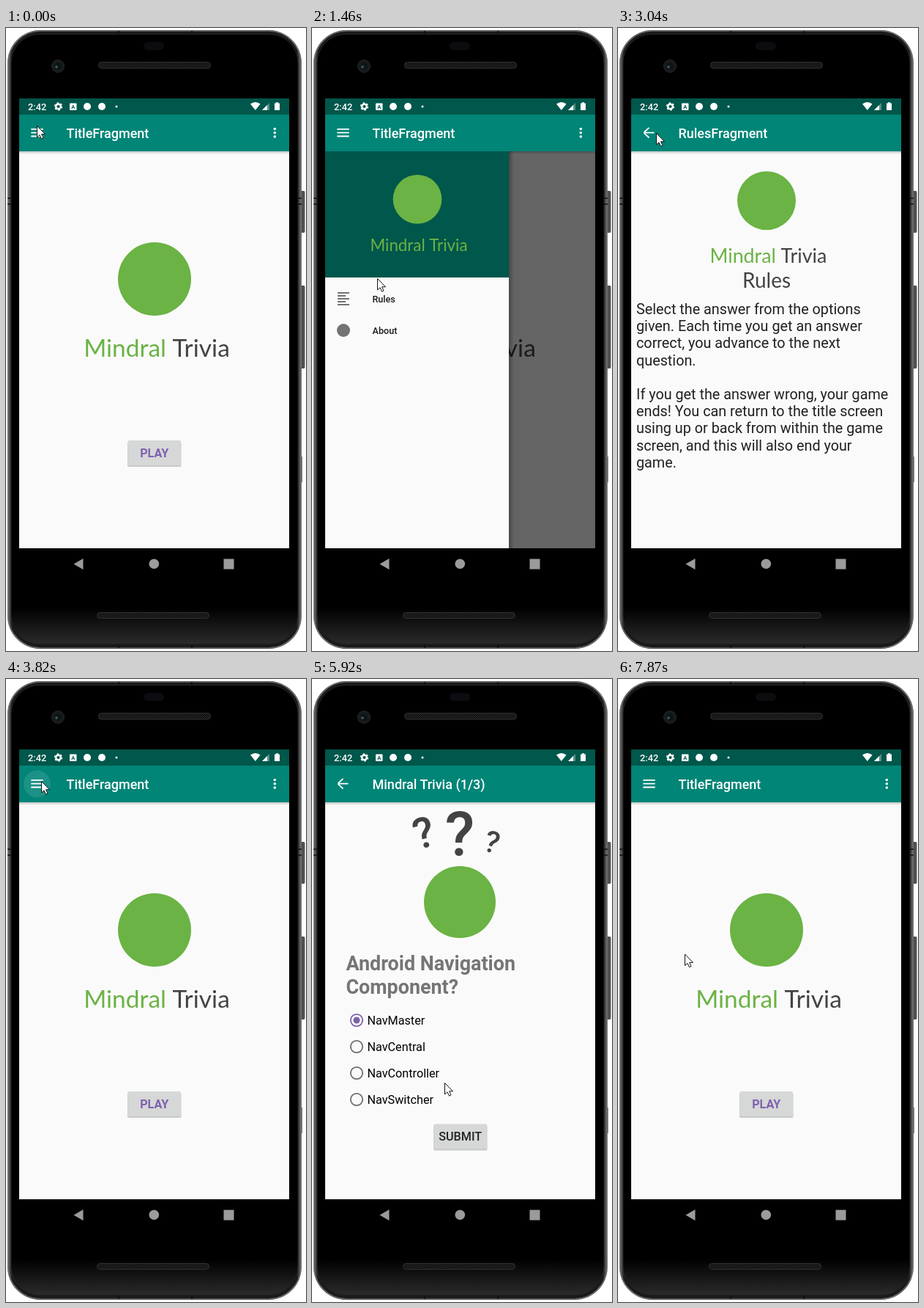
An HTML page that plays this animation: 410x849 px, repeating every 8000 ms.

```html
<!DOCTYPE html>
<html lang="en">
<head>
<meta charset="utf-8">
<title>Trivia app walkthrough</title>
<style>
  html, body { margin: 0; width: 100%; height: 100%; overflow: hidden; background: #fff; }
  svg { display: block; width: 100vw; height: 100vh; font-family: Roboto, sans-serif; }
  .word { font: 33.5px Lato, sans-serif; }
  .medium { font-weight: 500; }
  .bold { font-weight: 700; }
</style>
</head>
<body>
<svg viewBox="0 0 410 849">
  <defs>
    <linearGradient id="rim" x2="1" y2="0">
      <stop offset="0" stop-color="#777"/><stop offset=".016" stop-color="#1a1a1a"/>
      <stop offset=".984" stop-color="#1a1a1a"/><stop offset="1" stop-color="#777"/>
    </linearGradient>
    <linearGradient id="bezel" x2="0" y2="1">
      <stop offset=".94"/><stop offset="1" stop-color="#2b2b2b"/>
    </linearGradient>
    <linearGradient id="down" x2="0" y2="1">
      <stop stop-opacity=".22"/><stop offset="1" stop-opacity="0"/>
    </linearGradient>
    <linearGradient id="across">
      <stop stop-opacity=".3"/><stop offset="1" stop-opacity="0"/>
    </linearGradient>
    <pattern id="mesh" width="3" height="3" patternUnits="userSpaceOnUse">
      <rect width="3" height="3" fill="#101010"/><path d="M0 3L3 0" stroke="#333" stroke-width=".8"/>
    </pattern>
    <clipPath id="content"><rect x="18" y="168" width="369" height="541"/></clipPath>
    <clipPath id="playClip"><rect x="166.500" y="562" width="72.500" height="34" rx="2"/></clipPath>
  </defs>

  <!-- phone body -->
  <path d="M402 222h5q1.500 0 1.500 2v53q0 2-1.500 2h-5zM402 351h5q1.500 0 1.500 2v109q0 2-1.500 2h-5z" fill="#505050"/>
  <path d="M403 584h2v35h-2z" fill="#777"/>
  <rect x="2" y="3" width="402" height="843" rx="45" fill="url(#rim)"/>
  <rect x="3" y="4" width="400" height="841" rx="44" fill="none" stroke="#6c6c6c" stroke-width="1.500"/>
  <rect x="7" y="8.500" width="392" height="831" rx="39" fill="url(#bezel)" stroke="#222"/>
  <path d="M2 232h5M2 240h5M399 232h5M399 240h5M154 4v6M254 4v6M154 840v5M254 840v5" stroke="#111" stroke-width="1.500"/>
  <rect x="188" y="19" width="28" height="11" rx="5.500" fill="#0c0c10"/>
  <circle cx="71" cy="52" r="8.500" fill="#171a1b" stroke="#262626"/>
  <circle cx="71" cy="52" r="4.500" fill="#0a1515"/><circle cx="69" cy="53" r="1.800" fill="#49605f"/>
  <rect x="126.500" y="46.500" width="153" height="8.500" rx="4" fill="url(#mesh)" stroke="#303030"/>
  <rect x="124.500" y="796.500" width="153" height="8" rx="4" fill="url(#mesh)" stroke="#303030"/>
  <path d="M92.500 730.500L105.500 723v15zM297.500 723.500h14v14h-14z" fill="#9b9b9b"/>
  <circle cx="202.300" cy="730.300" r="6.800" fill="#9b9b9b"/>

  <!-- screen -->
  <rect x="18" y="96" width="369" height="613" fill="#fafafa"/>
  <g clip-path="url(#content)">
    <g id="rules">
      <g id="rulesBrand" transform="translate(40.600 -38.400) scale(.8)"></g>
      <text x="203" y="354" font-size="28" text-anchor="middle" fill="#434343" font-family="Lato, sans-serif">Rules</text>
      <g id="rulesText" font-size="19.800" fill="#212121"></g>
    </g>
    <g id="game">
      <g class="medium" fill="#434343" text-anchor="middle">
        <text x="202" y="241" font-size="83">?</text>
        <text transform="translate(158 229) rotate(-15)" font-size="58">?</text>
        <text transform="translate(242 236) rotate(16)" font-size="41">?</text>
      </g>
      <circle cx="202" cy="304" r="49" fill="#6ab344"/>
      <g class="bold" font-size="26.900" fill="#757575">
        <text x="46.500" y="397">Android Navigation</text><text x="46.500" y="428.500">Component?</text>
      </g>
      <g id="answers" font-size="16.200"></g>
      <g id="submit"></g>
    </g>
    <g id="home">
      <g id="homeBrand"></g>
      <g id="play"></g>
      <circle id="press" cx="201" cy="579" fill="#000" clip-path="url(#playClip)"/>
      <text class="bold" x="202.700" y="585.200" font-size="16.200" text-anchor="middle" fill="#7e62b0">PLAY</text>
    </g>
    <rect x="18" y="168" width="369" height="4" fill="url(#down)"/>
    <rect id="scrim" x="18" y="168" width="369" height="541"/>
    <g id="drawer">
      <rect x="269" y="168" width="7" height="541" fill="url(#across)"/>
      <rect x="18" y="168" width="251" height="541" fill="#fafafa"/>
      <rect x="18" y="168" width="251" height="172" fill="#00574b"/>
      <g id="drawerBrand" transform="translate(8.600 5.200) scale(.667)"></g>
      <path d="M35 361h16M35 365h11M35 369h16M35 373h11M35 377h16" stroke="#737373" stroke-width="1.800"/>
      <circle cx="43" cy="412" r="9" fill="#737373"/>
      <g class="medium" font-size="12.600" fill="#1c1c1c"><text x="82.500" y="374">Rules</text><text x="82.500" y="416.500">About</text></g>
    </g>
  </g>

  <!-- status bar and toolbar -->
  <rect x="18" y="96" width="369" height="22" fill="#00574b"/>
  <rect x="18" y="118" width="369" height="50" fill="#008577"/>
  <g fill="#fff">
    <text class="medium" x="30" y="111.500" font-size="12.800">2:42</text>
    <circle cx="71.500" cy="107" r="3.300" fill="none" stroke="#fff" stroke-width="2.400"/>
    <circle cx="71.500" cy="107" r="4.900" fill="none" stroke="#fff" stroke-width="1.500" stroke-dasharray="2.500 2.630"/>
    <rect x="87" y="102.500" width="9.500" height="9.500" rx="1"/>
    <text class="bold" x="91.700" y="110" font-size="7.500" text-anchor="middle" fill="#00574b">A</text>
    <circle cx="111" cy="107" r="5"/><circle cx="131" cy="107" r="5"/><circle cx="151" cy="107" r="1.500"/>
    <path d="M334 103.500q6.800-5 13.600 0L340.800 112z"/>
    <path d="M350 112l10-10v10z" opacity=".35"/><path d="M350 112l7-7v7z"/>
    <path d="M367 102.500h2v-1.300h3v1.300h2v9.500h-7z"/>
    <g id="more"><circle cx="367.300" cy="137.500" r="1.800"/><circle cx="367.300" cy="142.800" r="1.800"/><circle cx="367.300" cy="148.100" r="1.800"/></g>
    <text id="heading" class="medium" x="82.500" y="149.700" font-size="18"></text>
    <circle id="ripple" cx="42.500" cy="143" r="18.500"/>
  </g>
  <path id="icon" fill="none" stroke="#fff" stroke-width="1.800"/>
  <path id="cursor" d="M.5.5V16L4 12.800L6.500 18.200L9 17L6.600 11.800H11.500Z" fill="#fff" stroke="#111"/>
</svg>
<script>
const el = Object.fromEntries([...document.querySelectorAll('[id]')].map(e => [e.id, e]));
const LOOP = 8000, FRAME = LOOP / 61;
const BRAND = 'Mindral', PRODUCT = 'Trivia', HOME = 'TitleFragment';
const GREEN = '#6ab344', DARK = '#434343', DRAWER_WIDTH = 251, SLIDE = 184.5;

const pages = {
  rules: { heading: 'RulesFragment', enter: 1940, leave: 3440, fade: 360 },
  game: { heading: `${BRAND} ${PRODUCT} (1/3)`, enter: 5120, leave: 6780, fade: 390 }
};

// Pointer trips between the places it clicks or rests.
const trips = [
  { from: 0, to: 260, x: 43, y: 144 },
  { from: 1070, to: 1440, x: 89, y: 341 },
  { from: 1440, to: 1720, x: 103, y: 362 },
  { from: 2640, to: 3010, x: 52, y: 143 },
  { from: 3010, to: 3170, x: 48, y: 139 },
  { from: 4080, to: 4730, x: 201, y: 576.5 },
  { from: 5530, to: 5900, x: 181, y: 550 },
  { from: 5900, to: 6570, x: 42.5, y: 145 },
  { from: 7480, to: 7860, x: 91, y: 374.5 }
];

const mix = (a, b, p) => a + (b - a) * p;
const progress = (t, from, to) => Math.max(0, Math.min(1, (t - from) / (to - from)));
const ramp = (t, from, to) => (1 - Math.cos(Math.PI * progress(t, from, to))) / 2;
const pulse = (t, from, to) => Math.sin(Math.PI * progress(t, from, to));
const shown = (t, { enter, leave, fade }) => ramp(t, enter, enter + fade) - ramp(t, leave, leave + fade);

const brand = dark => `<circle cx="203" cy="342" r="50" fill="${GREEN}"/>
  <text class="word" x="219" y="448" text-anchor="end" fill="${GREEN}">${BRAND}</text>
  <text class="word" x="227.5" y="448" fill="${dark}">${PRODUCT}</text>`;

const button = y => `<rect x="166" y="${y + 1.5}" width="73.5" height="34.5" rx="2.5" opacity=".2"/>
  <rect x="166.5" y="${y}" width="72.5" height="34" rx="2" fill="#d6d7d7"/>`;

function answer(label, i) {
  const y = 465 + i * 36, color = i ? '#6e6e6e' : '#7b62a8';
  return `<circle cx="61" cy="${y}" r="8.2" fill="none" stroke="${color}" stroke-width="1.8"/>
    ${i ? '' : `<circle cx="61" cy="${y}" r="4.5" fill="${color}"/>`}
    <text x="75.5" y="${y + 6}">${label}</text>`;
}

function build() {
  el.homeBrand.innerHTML = el.rulesBrand.innerHTML = brand(DARK);
  el.drawerBrand.innerHTML = brand(GREEN);
  el.play.innerHTML = button(562);
  el.submit.innerHTML = button(606.5) +
    '<text class="medium" x="202.7" y="629.2" font-size="16.2" text-anchor="middle" fill="#222">SUBMIT</text>';
  el.rulesText.innerHTML = ['Select the answer from the options', 'given. Each time you get an answer',
    'correct, you advance to the next', 'question.', '', 'If you get the answer wrong, your game',
    'ends! You can return to the title screen', 'using up or back from within the game',
    'screen, and this will also end your', 'game.']
    .map((line, i) => `<text x="25" y="${390 + i * 23.2}">${line}</text>`).join('');
  el.answers.innerHTML = ['NavMaster', 'NavCentral', 'NavController', 'NavSwitcher'].map(answer).join('');
}

function place(node, x, y, opacity = 1) {
  node.setAttribute('transform', `translate(${x} ${y})`);
  node.setAttribute('opacity', opacity);
}

// Morphs the menu bars (p = 0) into a back arrow (p = 1).
function drawIcon(p) {
  const half = mix(8.2, 7, p), tipY = mix(4.8, .5, p);
  const endX = mix(8.2, 0, p), endY = mix(4.8, 6.8, p);
  el.icon.setAttribute('d', `M${-half} 0H${half}M${-half} ${-tipY}L${endX} ${-endY}M${-half} ${tipY}L${endX} ${endY}`);
  el.icon.setAttribute('transform', `translate(42.5 142.7) rotate(${180 * (p - 1)})`);
}

function moveCursor(t) {
  let x = 42, y = 133;
  for (const trip of trips) {
    const p = ramp(t, trip.from, trip.to);
    x = mix(x, trip.x, p);
    y = mix(y, trip.y, p);
  }
  place(el.cursor, x, y);
}

function render(now) {
  const t = Math.floor((now % LOOP) / FRAME) * FRAME;
  const rules = shown(t, pages.rules), game = shown(t, pages.game);
  const drawer = ramp(t, 280, 800) - ramp(t, 1950, 2140);

  place(el.rules, 0, 0, rules);
  place(el.game, SLIDE * (1 - game), 0, game);
  place(el.home, -SLIDE * game, 0, (1 - rules ** 1.5) * (1 - game));
  place(el.drawer, DRAWER_WIDTH * (drawer - 1), 0, drawer ? 1 : 0);
  el.scrim.setAttribute('opacity', .6 * drawer);

  el.press.setAttribute('r', 45 * ramp(t, 4880, 5250));
  el.press.setAttribute('opacity', .12 * pulse(t, 4880, 5400));
  el.ripple.setAttribute('opacity', .2 * (pulse(t, 280, 930) + pulse(t, 3170, 3950) + pulse(t, 6570, 7350)));

  const page = Object.values(pages).find(({ enter, leave }) => t > enter && t < leave);
  el.heading.textContent = page ? page.heading : HOME;
  el.more.setAttribute('opacity', page ? 0 : 1);
  drawIcon(rules + game);
  moveCursor(t);
}

build();
const begin = performance.now();
function tick() {
  render(performance.now() - begin);
  requestAnimationFrame(tick);
}
tick();
</script>
</body>
</html>
```
